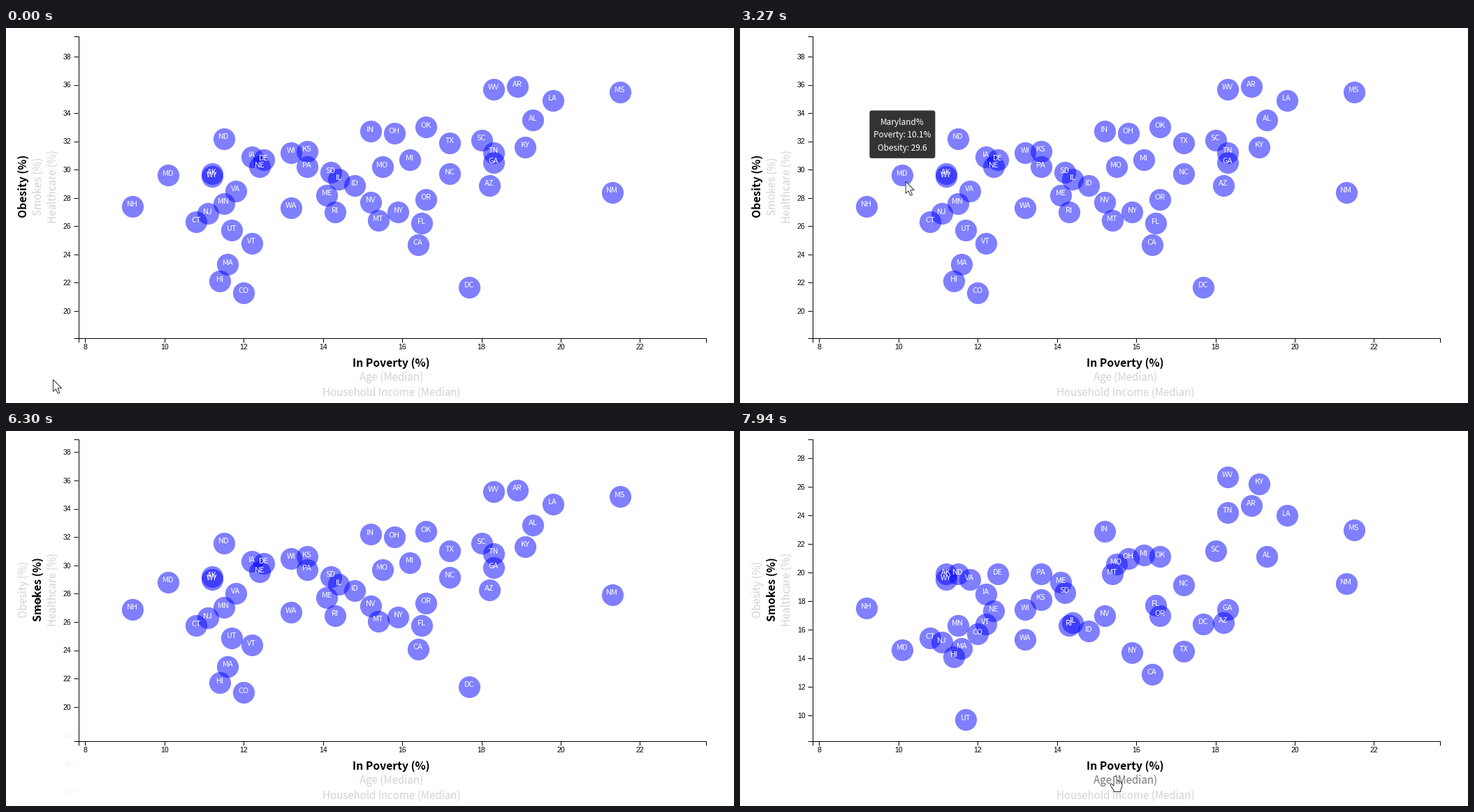
These frames come from a looping animation (1042x538 px, 8 s). A matplotlib script:

```python
import numpy as np
import matplotlib.pyplot as plt
from matplotlib.animation import FuncAnimation
from matplotlib.patches import Circle, FancyBboxPatch, Polygon

W, H, DPI = 1042, 538, 64
LOOP, STEP = 8000, 40
PT = 72 / DPI
SANS = ["Noto Sans CJK JP", "DejaVu Sans"]
TICK_FONT = "Liberation Sans"
RADIUS = 15.6

# poverty %, obesity %
RATES = {
    "AL": (19.3, 33.5), "AK": (11.2, 29.7), "AZ": (18.2, 28.9), "AR": (18.9, 35.9),
    "CA": (16.4, 24.7), "CO": (12.0, 21.3), "CT": (10.8, 26.3), "DE": (12.5, 30.7),
    "DC": (17.7, 21.7), "FL": (16.5, 26.2), "GA": (18.3, 30.5), "HI": (11.4, 22.1),
    "ID": (14.8, 28.9), "IL": (14.4, 29.3), "IN": (15.2, 32.7), "IA": (12.2, 30.9),
    "KS": (13.6, 31.3), "KY": (19.1, 31.6), "LA": (19.8, 34.9), "ME": (14.1, 28.2),
    "MD": (10.1, 29.6), "MA": (11.6, 23.3), "MI": (16.2, 30.7), "MN": (11.5, 27.6),
    "MS": (21.5, 35.5), "MO": (15.5, 30.2), "MT": (15.4, 26.4), "NE": (12.4, 30.2),
    "NV": (15.2, 27.7), "NH": (9.2, 27.4), "NJ": (11.1, 26.9), "NM": (21.3, 28.4),
    "NY": (15.9, 27.0), "NC": (17.2, 29.7), "ND": (11.5, 32.2), "OH": (15.8, 32.6),
    "OK": (16.6, 33.0), "OR": (16.6, 27.9), "PA": (13.6, 30.2), "RI": (14.3, 27.0),
    "SC": (18.0, 32.1), "SD": (14.2, 29.8), "TN": (18.3, 31.2), "TX": (17.2, 31.9),
    "UT": (11.7, 25.7), "VT": (12.2, 24.8), "VA": (11.8, 28.5), "WA": (13.2, 27.3),
    "WV": (18.3, 35.7), "WI": (13.2, 31.2), "WY": (11.2, 29.5),
}
SMOKES = [
    21.1, 19.9, 16.5, 24.7, 12.9, 15.7, 15.4, 19.9, 16.4, 17.7, 17.4, 14.1, 15.9,
    16.5, 22.9, 18.5, 18.1, 26.2, 24.0, 19.3, 14.6, 14.7, 21.2, 16.3, 23.0, 20.6,
    19.9, 17.3, 17.0, 17.5, 15.1, 19.2, 14.4, 19.1, 19.9, 21.0, 21.1, 17.0, 19.9,
    16.3, 21.5, 18.6, 24.2, 14.5, 9.7, 16.4, 19.5, 15.3, 26.7, 17.4, 19.5,
]
# code: (name, tooltip width)
HOVER = {"NH": ("New Hampshire", 111), "MD": ("Maryland", 94)}

# time, x, y of the pointer
PATH = np.array([
    (40, 67, 504), (300, 34, 455), (500, 28, 400), (700, 40, 350), (880, 55, 317),
    (1100, 100, 298), (1300, 160, 274), (1480, 188, 266), (1640, 188, 266),
    (1650, 188, 267), (2520, 188, 267), (2720, 198, 250), (3000, 226, 226),
    (3270, 238, 219), (3320, 238, 219), (3350, 232, 219), (4540, 232, 219),
    (4560, 230, 240), (4750, 190, 295), (4950, 130, 320), (5150, 75, 305),
    (5300, 48, 270), (5400, 45, 254), (5600, 45, 247), (6600, 45, 247),
    (6760, 50, 272), (6840, 82, 305), (7100, 300, 380), (7400, 590, 460),
    (7610, 695, 480), (7800, 560, 493), (7920, 537, 495),
])
CLICK, SWITCH, MORPH = 6000, 6036, 1045
HOVER_SMOKES, HOVER_AGE, FADE = 5380, 7790, 300
GRAY = 0.827

ARROW = np.array([(0, 0), (0, 17), (3.9, 13.4), (6.7, 20), (9.4, 18.8),
                  (6.6, 12.3), (12, 12.2)]) + 0.5
HAND = np.array([(-2, 1.6), (-0.7, 0.2), (1, 0.2), (2.3, 1.6), (2.3, 6.8), (4, 6.4),
                 (5, 7.6), (6.8, 7.4), (7.6, 8.7), (9, 8.6), (10, 10), (10, 15),
                 (8, 19), (8, 22.5), (-2, 22.5), (-2, 20.3), (-5.8, 15.5),
                 (-7, 12.4), (-5.6, 11.2), (-4, 12), (-2, 14)])
KNUCKLES = np.array([(2.3, 6.8), (2.3, 11), (np.nan, np.nan), (5, 7.6), (5, 11),
                     (np.nan, np.nan), (7.6, 8.7), (7.6, 11.4)])
IBEAM = np.array([(-3, -8), (3, -8), (0, -8), (0, 8), (-3, 8), (3, 8)])


def px(v):
    return 113.3 + 56.72 * (np.asarray(v) - 8)


def y_obesity(v):
    return 41 + 20.28 * (38 - np.asarray(v))


def y_smokes(v):
    return 39 + 20.5 * (28 - np.asarray(v))


def ease(u):
    u = np.clip(u, 0, 1)
    return 4 * u ** 3 if u < 0.5 else 1 - 4 * (1 - u) ** 3


fig = plt.figure(figsize=(W / DPI, H / DPI), dpi=DPI, facecolor="white")
ax = fig.add_axes([0, 0, 1, 1])
ax.set_xlim(0, W)
ax.set_ylim(H, 0)
ax.axis("off")


def text(x, y, s, size, font=SANS, **kw):
    kw = {"ha": "center", "va": "baseline", "zorder": 3, **kw}
    return ax.text(x, y, s, fontsize=size * PT, family=font, **kw)


def line(xs, ys, color="black", **kw):
    return ax.plot(xs, ys, color=color, lw=kw.pop("lw", 1) * PT,
                   solid_capstyle="butt", **kw)[0]


# axes
line([0, W], [537.5, 537.5], "#dcdcdc")
line([97, 103.5, 103.5, 97], [11.5, 11.5, 444.5, 444.5])
line([103.5, 103.5, 1001.5, 1001.5], [451, 444.5, 444.5, 451])
for v in range(8, 23, 2):
    line([px(v)] * 2, [444.5, 451])
    text(px(v), 461, str(v), 10.4, TICK_FONT)

ticks = []
for v in range(10, 39, 2):
    ticks.append((v, line([97, 103], [0, 0]),
                  text(93.5, 0, str(v), 10.4, TICK_FONT, ha="right")))


# axis titles
def style(label, active, shade=GRAY):
    label.set_color("black" if active else (shade,) * 3)
    label.set_fontweight("bold" if active else "normal")
    label.set_fontsize((15.7 if active else 15.1) * PT)


def side_title(x, s):
    return text(x, 227, s, 15.1, rotation=90, rotation_mode="anchor")


poverty = text(551.5, 485.7, "In Poverty (%)", 15.1)
age = text(551.5, 506.5, "Age (Median)", 15.1)
income = text(551.5, 527.5, "Household Income (Median)", 15.1)
obesity = side_title(30.3, "Obesity (%)")
smokes = side_title(51.3, "Smokes (%)")
health = side_title(72.3, "Healthcare (%)")
style(poverty, True)
style(income, False)
style(health, False)

# bubbles
codes = list(RATES)
cx = px([RATES[c][0] for c in codes])
cy_from = y_obesity([RATES[c][1] for c in codes])
cy_to = y_smokes(SMOKES)
dots = ax.scatter(cx, cy_from, s=(2 * RADIUS * PT) ** 2, color=(0, 0, 1, 0.5),
                  linewidths=0, zorder=2)
names = [text(x, 0, c, 11, color="white") for x, c in zip(cx, codes)]

# tooltip
tip_box = FancyBboxPatch((0, 0), 10, 68, boxstyle="round,pad=0,rounding_size=3",
                         fc=(0, 0, 0, 0.8), ec="none", zorder=5)
ax.add_patch(tip_box)
tip_rows = [text(0, 0, "", 11.8, color="white", zorder=6) for _ in range(3)]

# pointer
INK = "#333333"
glow = ax.add_patch(Circle((45, 247), 12, fc=(1, 1, 0, 0.6), ec="none", zorder=7))


def outline(shape):
    return ax.add_patch(Polygon(shape, closed=True, fc="white", ec=INK,
                                lw=PT, joinstyle="round", zorder=8))


arrow, hand = outline(ARROW), outline(HAND)
knuckles = line([], [], INK, zorder=9)
ibeam = line([], [], INK, zorder=9)


def draw_axis(e):
    for v, mark, label in ticks:
        y = (1 - e) * y_obesity(v) + e * y_smokes(v)
        alpha = 1 if 20 <= v <= 28 else (e if v < 20 else 1 - e)
        mark.set_ydata([y, y])
        label.set_y(y + 3.8)
        mark.set_alpha(alpha)
        label.set_alpha(alpha)


def draw_bubbles(e):
    cy = (1 - e) * cy_from + e * cy_to
    dots.set_offsets(np.column_stack([cx, cy]))
    for label, y in zip(names, cy):
        label.set_y(y + 0.5)
    return cy


def draw_titles(t):
    def shade(start):
        return GRAY * (1 - np.clip((t - start) / FADE, 0, 1))

    switched = t >= SWITCH
    style(obesity, not switched)
    style(smokes, switched, shade(HOVER_SMOKES))
    style(age, False, shade(HOVER_AGE))


def draw_tooltip(pos, cy):
    hit = None
    for c in HOVER:
        i = codes.index(c)
        if np.hypot(pos[0] - cx[i], pos[1] - cy[i]) < RADIUS:
            hit = c
    for part in (tip_box, *tip_rows):
        part.set_visible(hit is not None)
    if hit is None:
        return
    i = codes.index(hit)
    name, width = HOVER[hit]
    rate, fat = RATES[hit]
    top = cy[i] - 93
    tip_box.set_bounds(cx[i] - width / 2, top, width, 68.5)
    rows = (f"{name}%", f"Poverty: {rate}%", f"Obesity: {fat}")
    for k, (row, s) in enumerate(zip(tip_rows, rows)):
        row.set_text(s)
        row.set_position((cx[i], top + 20.3 + 18.8 * k))


def draw_pointer(t, pos):
    if HOVER_SMOKES <= t < SWITCH or t >= HOVER_AGE:
        kind = "hand"
    elif SWITCH <= t < 6680:
        kind = "ibeam"
    else:
        kind = "arrow"
    arrow.set_visible(kind == "arrow")
    hand.set_visible(kind == "hand")
    knuckles.set_visible(kind == "hand")
    ibeam.set_visible(kind == "ibeam")
    arrow.set_xy(ARROW + pos)
    hand.set_xy(HAND + pos)
    knuckles.set_data(*(KNUCKLES + pos).T)
    ibeam.set_data(*(IBEAM + pos).T)
    glow.set_visible(CLICK <= t < CLICK + 220)


def update(i):
    t = i * STEP
    pos = np.array([np.interp(t, PATH[:, 0], PATH[:, k]) for k in (1, 2)])
    e = ease((t - SWITCH) / MORPH)
    draw_axis(e)
    cy = draw_bubbles(e)
    draw_titles(t)
    draw_tooltip(pos, cy)
    draw_pointer(t, pos)
    return []


anim = FuncAnimation(fig, update, frames=LOOP // STEP, interval=STEP,
                     repeat=True, repeat_delay=0, blit=False)
plt.show()
```
